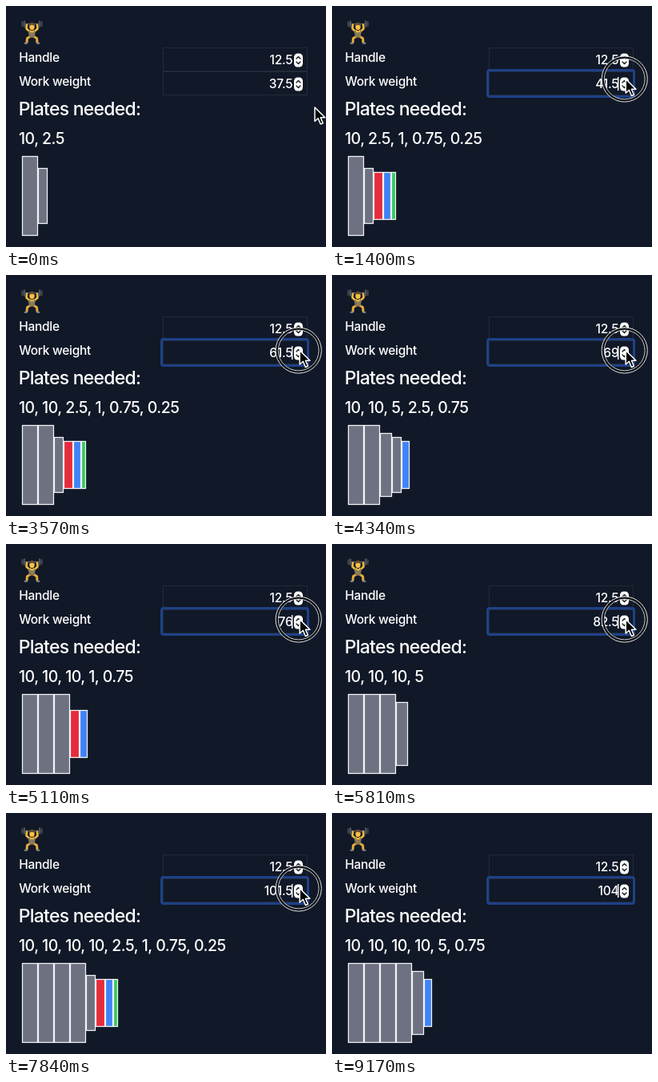
Write an HTML page that moves like this. It is 400 px wide and 302 px high and loops after 9.73 s.

```html
<!DOCTYPE html>
<html lang="en">
<head>
<meta charset="utf-8">
<title>Plate calculator</title>
<style>
  html, body { margin: 0; width: 100%; height: 100%; overflow: hidden; background: #111827; }
  svg { display: block; width: 400px; height: 302px; }
  text { font-family: Inter, Roboto, "Liberation Sans", sans-serif; font-weight: 500; fill: #fff; white-space: pre; }
  .label { font-size: 15.5px; letter-spacing: -0.3px; }
  .value { font-size: 15.5px; letter-spacing: -0.2px; text-anchor: end; }
  .heading { font-size: 23px; letter-spacing: -0.75px; }
  .list { font-size: 19.5px; letter-spacing: -0.5px; }
  .field { fill: none; stroke: #222b3a; }
</style>
</head>
<body>
<svg viewBox="0 0 400 302" xmlns="http://www.w3.org/2000/svg">
  <defs>
    <g id="spinner">
      <rect width="11" height="17" rx="4.5" fill="#fff"/>
      <path d="M3 6.5 5.5 4 8 6.5M3 10.5 5.5 13 8 10.5" fill="none" stroke="#222" stroke-width="1.5" stroke-linecap="round" stroke-linejoin="round"/>
    </g>
  </defs>
  <rect width="400" height="302" fill="#111827"/>

  <g id="lifter" stroke-linecap="round" stroke-linejoin="round" fill="none">
    <path d="M20 22.5H45" stroke="#59616b" stroke-width="1.3"/>
    <path d="M20.5 20v5M44.5 20v5" stroke="#3d434d" stroke-width="2.4"/>
    <path d="M23 19v7M42 19v7" stroke="#4a515c" stroke-width="2"/>
    <path d="M30.5 38 26.5 40.5 26 45.5M34.5 38 38.5 40.5 39 45.5" stroke="#e5ab3c" stroke-width="3"/>
    <path d="M23.5 46.8h2.5M39 46.8h2.5" stroke="#80858d" stroke-width="2"/>
    <path d="M29 31.5 25.5 28.5 26 23.5M36 31.5 39.5 28.5 39 23.5" stroke="#f0b83f" stroke-width="2.6"/>
    <path d="M28.5 31.5h8l-1.5 7.5h-5z" fill="#8a7c55" stroke="#8a7c55"/>
    <path d="M30.5 31q2 3 4 0" stroke="#f0b83f" stroke-width="2"/>
    <ellipse cx="32.5" cy="26" rx="3.2" ry="4" fill="#f7c045"/>
    <path d="M29.3 25q0-4.6 3.2-4.6t3.2 4.6q-3.2-2.4-6.4 0z" fill="#6a4a2c"/>
  </g>

  <text class="label" x="16.3" y="70">Handle</text>
  <text class="label" x="16.3" y="100">Work weight</text>
  <text class="heading" x="15.7" y="137">Plates needed:</text>
  <text class="list" id="list" x="16" y="173"></text>

  <rect class="field" x="196.5" y="52.5" width="180" height="29"/>
  <rect class="field" x="196.5" y="82.5" width="180" height="29"/>
  <rect id="focus" x="194.5" y="80.5" width="183" height="33" rx="2.5" fill="none" stroke="#1e4188" stroke-width="3"/>
  <text class="value" x="358.5" y="72.7">12.5</text>
  <text class="value" id="weight" x="358.5" y="102.7"></text>
  <rect id="caret" x="357" y="89" width="1.4" height="17" fill="#fff"/>
  <use href="#spinner" x="360" y="59.5"/>
  <use href="#spinner" x="360" y="89.5"/>

  <g id="plates" stroke="#f3f4f6" stroke-width="1.25"></g>

  <g id="pointer">
    <g id="press" fill="none" transform="translate(-1.5)">
      <circle r="27" stroke="#0a0d13" stroke-width="3"/>
      <circle r="28.6" stroke="#e4e6e8"/>
      <circle r="25.4" stroke="#c9ccd0"/>
    </g>
    <path d="M0 0V17.5L4.1 13.8 7.2 21 10.2 19.7 7.2 12.7H12.8Z" fill="#000" stroke="#fff" stroke-width="1.5" stroke-linejoin="round"/>
  </g>
</svg>
<script>
const LOOP = 9730, TICK = 70;
const HANDLE = 12.5, START = 37.5, STEP = 0.5, LAST_STEP = 133;
const PRESS = 600, RELEASE = 8100, REPEAT_FROM = 1066, REPEAT_EVERY = 53.4;

const GREY = "#6d7182";
const PLATES = [
  { kg: 10, w: 20, h: 100, fill: GREY, many: true },
  { kg: 5, w: 15, h: 80, fill: GREY },
  { kg: 2.5, w: 12, h: 70, fill: GREY },
  { kg: 1, w: 12, h: 60, fill: "#e52b3c" },
  { kg: 0.75, w: 10, h: 60, fill: "#4083f7" },
  { kg: 0.5, w: 8, h: 60, fill: "#eab308" },
  { kg: 0.25, w: 6, h: 60, fill: "#32cd58" }
];

// Pointer stops: time, x, y
const PATH = [
  [0, 386, 127], [560, 367.2, 86.5], [840, 367.2, 86.5], [1050, 367.2, 91.5],
  [1820, 367.2, 91.5], [2030, 367.2, 94.5], [8470, 367.2, 94.5], [9170, 115, 306]
];

const $ = id => document.getElementById(id);
const show = (id, on) => $(id).setAttribute("visibility", on ? "visible" : "hidden");
const smooth = u => u * u * (3 - 2 * u);

function pointerAt(t) {
  const i = PATH.findIndex(stop => stop[0] > t);
  if (i < 0) return PATH[PATH.length - 1].slice(1);
  const [t0, x0, y0] = PATH[i - 1], [t1, x1, y1] = PATH[i];
  const u = smooth((t - t0) / (t1 - t0));
  return [x0 + (x1 - x0) * u, y0 + (y1 - y0) * u];
}

function weightAt(t) {
  let steps = t < PRESS ? 0 : 1;
  if (t >= REPEAT_FROM) steps = 2 + Math.floor((t - REPEAT_FROM) / REPEAT_EVERY);
  return START + STEP * Math.min(steps, LAST_STEP);
}

function platesFor(weight) {
  let rest = (weight - HANDLE) / 2;
  return PLATES.flatMap(plate => {
    const fits = Math.floor(rest / plate.kg);
    const count = plate.many ? fits : Math.min(1, fits);
    rest -= count * plate.kg;
    return Array(count).fill(plate);
  });
}

function drawPlates(plates) {
  let x = 20;
  $("plates").innerHTML = plates.map(({ w, h, fill }) => {
    const rect = `<rect x="${x + 0.5}" y="${238.5 - h / 2}" width="${w - 1}" height="${h - 1}" fill="${fill}"/>`;
    x += w;
    return rect;
  }).join("");
}

function render(time) {
  const t = Math.floor(time % LOOP / TICK) * TICK;
  const weight = weightAt(t), plates = platesFor(weight);
  $("weight").textContent = weight;
  $("list").textContent = plates.map(p => p.kg).join(", ");
  drawPlates(plates);

  const focused = t >= PRESS;
  show("focus", focused);
  show("caret", focused && !(t >= 8620 && t < 9120));
  show("press", focused && t < RELEASE);
  $("pointer").setAttribute("transform", `translate(${pointerAt(t)})`);
}

const begin = performance.now();
function loop() {
  render(performance.now() - begin);
  requestAnimationFrame(loop);
}
loop();
</script>
</body>
</html>
```
